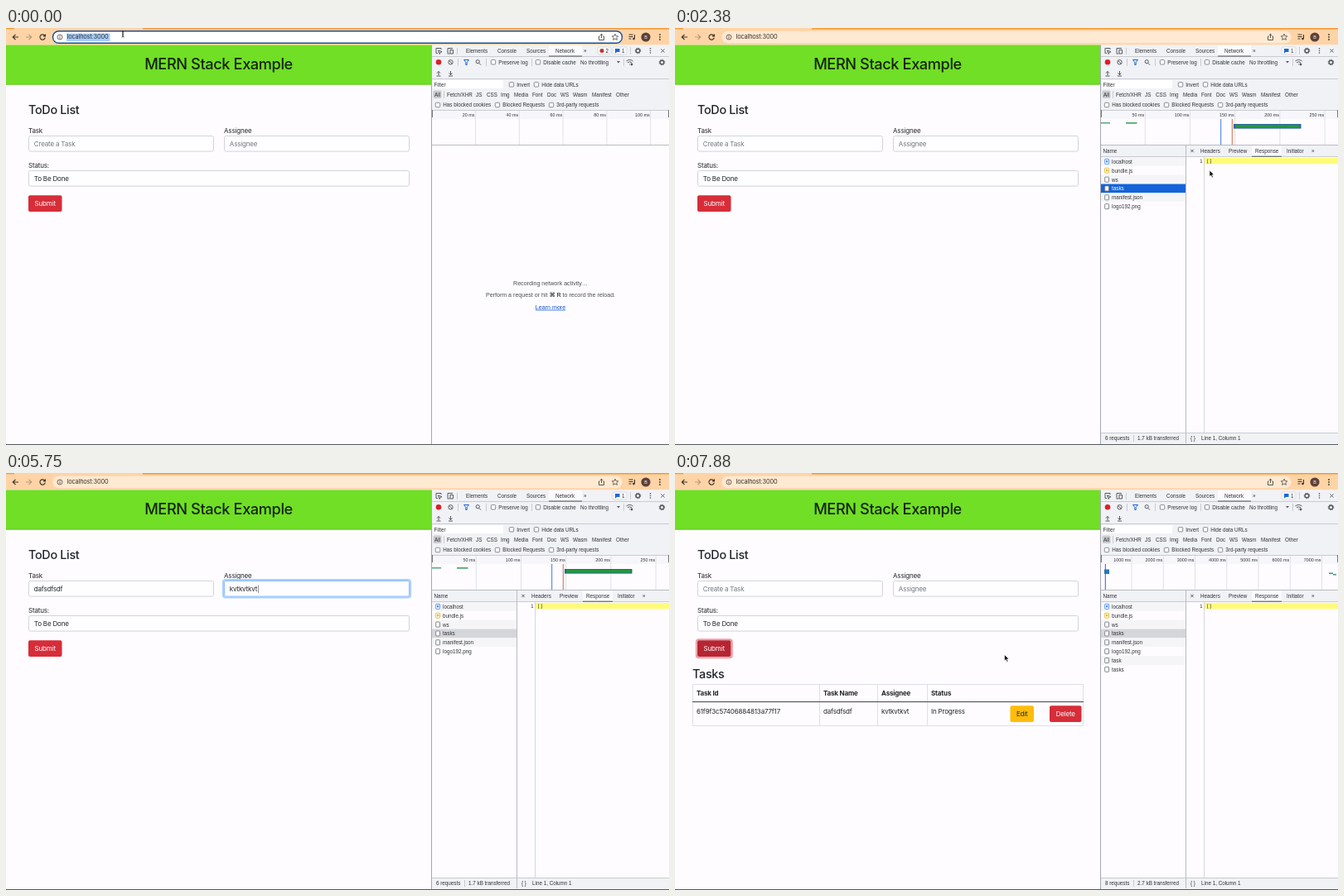
These frames come from a looping animation (800 by 504 pixels, 8000 ms). An HTML page:

```html
<!DOCTYPE html>
<html lang="en">
<head>
<meta charset="utf-8">
<title>MERN Stack Example</title>
<style>
html, body { margin: 0; width: 100%; height: 100%; overflow: hidden; background: #fefcff; }
svg { display: block; position: absolute; left: 0; top: 0; width: 800px; height: 504px; }
text { font: 6.3px "Liberation Sans", Arial, sans-serif; fill: #303236; }
.page { font: 8px Inter, sans-serif; letter-spacing: -.022em; fill: #212529; }
.hint { fill: #73787e; }
.bold { font-weight: 700; }
.light { fill: #fff; }
.h1 { font-size: 18.2px; font-weight: 500; fill: #14230a; }
.h2 { font-size: 14.4px; font-weight: 500; }
.url { font-size: 7.4px; fill: #3a3028; }
.small { font-size: 5.4px; }
.info { font-size: 7.1px; fill: #4b4e53; }
.link { fill: #1155cc; text-decoration: underline; }
.under { text-decoration: underline; }
.mono { font: 6px "DejaVu Sans Mono", monospace; }
.blue { fill: #1a5fd0; }
</style>
</head>
<body>
<svg viewBox="0 0 800 504"><g id="base"></g><g id="live"></g><g id="pointer"></g></svg>
<script>
const LOOP = 8000, STEP = 125;
const INK = '#55585d', LINE = '#c9cbd1', BAR = '#f1f2f6', PAPER = '#fefcff';

const rect = (x, y, w, h, fill, extra = '') =>
  `<rect x="${x}" y="${y}" width="${w}" height="${h}" fill="${fill}" ${extra}/>`;
const text = (x, y, s, cls = '', anchor = 'start') =>
  `<text x="${x}" y="${y}" class="${cls}" text-anchor="${anchor}">${s}</text>`;
const path = (d, stroke = INK, width = 1, fill = 'none') =>
  `<path d="${d}" stroke="${stroke}" stroke-width="${width}" fill="${fill}"/>`;
const disc = (x, y, r, fill, stroke = 'none', width = 1) =>
  `<circle cx="${x}" cy="${y}" r="${r}" fill="${fill}" stroke="${stroke}" stroke-width="${width}"/>`;
const hline = (x1, x2, y, color = LINE) => path(`M${x1} ${y}H${x2}`, color);
const vline = (x, y1, y2, color = LINE) => path(`M${x} ${y1}V${y2}`, color);
const check = (x, y, label) =>
  rect(x - 2.7, y - 2.7, 5.4, 5.4, '#fff', 'rx="1" stroke="#6d7075" stroke-width=".8"') + text(x + 6.3, y + 2.2, label);
const dots = (x, y) => [-2.6, 0, 2.6].map(d => disc(x, y + d, .8, INK)).join('');
const gear = (x, y) => disc(x, y, 2.3, 'none', INK, 1.4) +
  `<circle cx="${x}" cy="${y}" r="3.3" fill="none" stroke="${INK}" stroke-dasharray="1.3 1.29"/>`;
const cross = (x, y, r = 2) => path(`M${x - r} ${y - r}l${2 * r} ${2 * r}m0 ${-2 * r}l${-2 * r} ${2 * r}`);

function browserBar() {
  const dark = '#40362d';
  return rect(0, 0, 800, 20.5, '#fed4a6') + rect(165, 0, 635, 1.6, '#f79b3c') + rect(0, 0, 10, 1.4, '#f79b3c') +
    path('M15 11H8.5m3-3.2l-3.2 3.2 3.2 3.2', dark, 1.2) +
    path('M24 11h6.5m-3-3.2l3.2 3.2-3.2 3.2', '#b89a7b', 1.2) +
    path('M46.8 9.2a3.2 3.2 0 1 0 .5 2.5M47.4 7.4v2.4h-2.5', dark, 1.2) +
    path('M755 8h-3.5m0 0h5M751.500 10.500h5M751.500 13h3M758.500 8v5', dark, 1.1) + disc(757.4, 13.1, 1.3, dark) +
    disc(772, 11, 5.6, '#5d4138') + text(772, 13, 'B', 'small light', 'middle') +
    [8, 11, 14].map(y => disc(789, y, .9, dark)).join('');
}

function page() {
  return rect(0, 20.5, 513, 48, '#70df26') + hline(0, 513, 68, '#66c72a') +
    text(256.5, 50, 'MERN Stack Example', 'page h1', 'middle') +
    text(27, 104, 'ToDo List', 'page h2') +
    text(27, 127, 'Task', 'page') + text(263, 127, 'Assignee', 'page') + text(27, 169, 'Status:', 'page');
}

function devtools() {
  const tabs = [[555, 'Elements'], [593, 'Console'], [628, 'Sources'], [663, 'Network'], [697, '»']];
  const types = [[517, 'All'], [532, 'Fetch/XHR'], [567, 'JS'], [580, 'CSS'], [597, 'Img'], [613, 'Media'],
    [635, 'Font'], [653, 'Doc'], [669, 'WS'], [684, 'Wasm'], [707, 'Manifest'], [736, 'Other']];
  const put = y => ([x, s]) => text(x, y, s);
  return rect(514, 20.5, 286, 79, BAR) +
    rect(655, 21, 40, 13, '#fbfbfe') + [34.5, 61.5, 99.5].map(y => hline(514, 800, y)).join('') +
    hline(655, 695, 34, '#4c5055') + tabs.map(put(29.7)).join('') +
    path('M525 26v-1.500h-6v6h2M521.500 27l4.500 1.700-2 .8-.8 2z') +
    path('M533 30.500v-6h6M536 26.500h3.500v4.500h-3.500zM532.500 31h3') +
    vline(544.5, 24, 32) + gear(762.5, 27.5) + dots(777.5, 27.5) + cross(792.5, 27.5) +
    disc(522, 41.3, 3.3, '#dc2027') + disc(536.5, 41.3, 2.7, 'none', INK) + path('M534.700 39.500l3.600 3.600') +
    vline(545.5, 37, 46) + path('M552.500 38.500h6l-2.300 3v3h-1.400v-3z', '#1a67d8', 1) +
    disc(569.2, 40.7, 2.1, 'none', INK) + path('M570.700 42.300l2.300 2.400') + vline(579.5, 37, 46) +
    check(588, 41.3, 'Preserve log') + vline(634.5, 37, 46) + check(642, 41.3, 'Disable cache') +
    text(693, 43.5, 'No throttling') + path('M737 40h4l-2 2.600z', 'none', 0, INK) + vline(745.5, 37, 46) +
    path('M748.500 40q4-3.200 8 0M750 41.800q2.500-2 5 0M752.500 43.500v.8') + disc(755, 44, 1.4, INK) + gear(791.5, 41.5) +
    path('M522 57v-4.500m-2 2l2-2 2 2M519.500 58h5') + path('M536.500 52v4.500m-2-2l2 2 2-2M534 58h5') +
    rect(515, 63, 85, 10, '#fff') + text(516.5, 70.6, 'Filter') +
    check(610, 68.3, 'Invert') + check(640, 68.3, 'Hide data URLs') +
    rect(515.5, 75.5, 10, 9.5, '#c9cbd0', 'rx="1.5"') + vline(528.5, 76, 85) + types.map(put(82.5)).join('') +
    check(521, 93, 'Has blocked cookies') + check(593, 93, 'Blocked Requests') + check(658, 93, '3rd-party requests');
}

function addressBar(s) {
  const style = s.loaded ? '' : 'stroke="#1c4f94" stroke-width="1.4"';
  return rect(56.5, 3.7, 687, 14.6, s.loaded ? '#fee9d2' : '#fff', `rx="7.3" ${style}`) +
    (s.loaded ? '' : rect(73, 6.5, 52.5, 9.5, '#a5cdfd')) +
    disc(65, 11, 3, 'none', '#50473f', .8) + path('M65 10.300v2.500M65 8.800v.9', '#50473f', .9) +
    text(73.5, 13.4, 'localhost:3000', 'page url') +
    path('M716.500 10h-1v4.500h6V10h-1M718.500 12V7.300m-1.600 1.500l1.600-1.500 1.600 1.500', '#50473f', .9) +
    path('M735 7.200l1.100 2.500 2.700.2-2 1.800.6 2.700-2.400-1.400-2.400 1.400.6-2.700-2-1.800 2.700-.2z', '#50473f', .8);
}

function field(x, y, w, value, hint, focus, caret) {
  const ring = focus ? rect(x - 1, y - 1, w + 2, 21.5, 'none', 'rx="3" stroke="#a9d0fb" stroke-width="2.2"') : '';
  const caretMark = focus && caret ? '<tspan dx=".2" font-weight="300">|</tspan>' : '';
  return ring + rect(x + .5, y + .5, w - 1, 18.6, '#fefdff', `rx="2" stroke="${focus ? '#80b7fb' : '#cdd1d7'}" stroke-width=".9"`) +
    text(x + 6.8, y + 12.8, (value || (caretMark ? '' : hint)) + caretMark, value ? 'page' : 'page hint');
}

function button(x, y, w, label, fill, cls = 'light') {
  return rect(x, y, w, 19.8, fill, 'rx="2"') + text(x + w / 2, y + 12.9, label, 'page ' + cls, 'middle');
}

function form(s) {
  return field(27, 130, 224, s.task, 'Create a Task', s.focus === 'task', true) +
    field(263, 130, 224, s.assignee, 'Assignee', s.focus === 'assignee', true) +
    field(27, 172, 460, 'To Be Done', '', s.focus === 'status', false) +
    (s.focus === 'submit' ? rect(25.8, 201.2, 43, 22, 'none', 'rx="3" stroke="#ee9ca4" stroke-width="2"') : '') +
    button(27, 202.3, 40.5, 'Submit', s.focus === 'submit' ? '#b62632' : '#d62d39');
}

function taskTable() {
  const cols = [[26, 'Task Id', '61f9f3c57406884813a77f17'], [179, 'Task Name', TASK],
    [249, 'Assignee', PERSON], [309, 'Status', 'In Progress']];
  return text(21, 247.5, 'Tasks', 'page h2') +
    rect(21.5, 255.5, 471, 50, 'none', 'stroke="#dde0e5"') +
    [174.5, 244.5, 304.5].map(x => vline(x, 255, 305, '#dde0e5')).join('') +
    hline(21, 493, 276.6, '#3b3f44') +
    cols.map(([x, head, cell]) => text(x, 269, head, 'page bold') + text(x, 290.8, cell, 'page')).join('') +
    button(404.5, 281.3, 28.5, 'Edit', '#ffbc0b', '') + button(452, 281.3, 38.5, 'Delete', '#d62d39');
}

function overview(s) {
  const [first, gap, unit, count] = !s.loaded ? [566.5, 52.8, 20, 5] : s.saved ? [551, 38.25, 1000, 7] : [567.3, 54.2, 50, 5];
  let out = rect(514, 100, 286, 41.5, PAPER) + rect(514, 100, 286, 10, '#f7f7fb');
  for (let i = 0; i < count; i++) {
    const x = first + i * gap;
    out += vline(x, 100, 141, '#e0e1e6') + text(x - 1, 106.6, `${(i + 1) * unit} ms`, 'small', 'end');
  }
  if (s.saved) {
    out += rect(518, 116.500, 6, 5.5, '#2e78b7') + vline(519.3, 110, 141, '#2866c8') +
      rect(789, 120.500, 5, 1.5, '#3f9c79') + rect(794, 122, 4, 1.5, '#3f9c79');
  } else if (s.loaded) {
    out += rect(514, 114, 11, 1.5, '#55a77d') + rect(544, 114, 13.500, 1.7, '#4ca665') +
      vline(658.7, 110, 141, '#3a7be0') + vline(672.3, 110, 141, '#cd6a48') +
      rect(674, 116, 81.5, 5.6, '#2763a5') + rect(676, 117, 78, 3.6, '#24983b');
  }
  return out + vline(514.5, 99, 108, '#777') + vline(799.5, 99, 108, '#777') + hline(514, 800, 141.5, '#b9bbc1');
}

const ROWS = [
  ['localhost', '304', 'do…', 'Other', '29…', '7 ms'],
  ['bundle.js', '304', 'script', '(index)', '30…', '12 …'],
  ['ws', '101', 'we…', 'WebSo…', '0 B', 'Pe…'],
  ['tasks', '200', 'fetch', 'TaskSer…', '32…', '72 …'],
  ['manifest.json', '304', 'ma…', 'Other', '36…', '2 ms'],
  ['logo192.png', '304', 'png', 'Other', '36…', '2 ms'],
  ['task'], ['tasks']
];
const rowTop = i => 156 + i * 10.85;

function requestRow(row, i, s) {
  const top = rowTop(i), y = top + 7.8, picked = i === 3 && s.picked;
  const width = s.panel ? 102.5 : 286;
  const fill = picked ? (s.focus ? '#d5d6da' : '#1463d9') : i % 2 ? PAPER : '#f5f5f8';
  const tone = picked && !s.focus ? 'light' : '';
  const icon = ['#4c8ff0', '#e3b627'][i] || '#777b82';
  let out = rect(514, top, width, 10.85, fill) +
    rect(518.7, top + 2.4, 4.8, 6, '#fff', `rx=".6" stroke="${icon}" stroke-width=".9"`) +
    (i < 2 ? rect(520, top + 4, 2.2, 2.5, icon) : '') + text(527, y, row[0], tone);
  if (!s.panel) {
    const linked = i > 0 && i < 4 ? 'under ' : '';
    out += text(584, y, row[1], tone) + text(604, y, row[2], tone) + text(624.500, y, row[3], linked + tone) +
      text(673.5, y, row[4], tone, 'end') + text(694.5, y, row[5], tone, 'end');
  }
  return out;
}

function waterfall(count) {
  const bars = [[0, 700, 6, '#25a04b'], [1, 712, 7, '#25a04b'], [2, 764.5, 3, '#8b6a50'],
    [3, 767.5, 33, '#18a135'], [4, 769, 2, '#3f90e9'], [5, 770, 2.2, '#3f90e9']];
  return bars.filter(b => b[0] < count).map(([i, x, w, fill]) => rect(x, rowTop(i) + 2.6, w, 5.8, fill) +
      (i < 2 ? rect(x + w - 1.5, rowTop(i) + 2.6, 1.5, 5.8, '#3179ce') + rect(x - 1.5, rowTop(i) + 4.500, 1.5, 2, '#b8bbc2') : '') +
      (i === 3 ? rect(765.500, rowTop(3) + 3.5, 2, 4, '#f2a23a') : '')).join('') +
    vline(759, 156, 489, '#5f93dc') + vline(765, 156, 489, '#b07a5d');
}

function responsePanel() {
  const tabs = [[634, 'Headers'], [668, 'Preview'], [700, 'Response'], [738, 'Initiator'], [768, '»']];
  return rect(617, 142, 183, 347, PAPER) + rect(617, 142, 183, 13.5, BAR) + rect(696, 142, 36, 13.5, '#fafafd') +
    hline(617, 800, 155.5) + hline(696, 732, 155.2, '#4c5055') + cross(624, 148.5, 1.7) +
    tabs.map(([x, s]) => text(x, 150.6, s)).join('') +
    rect(639, 157, 161, 7.3, '#fffb78') + vline(638.5, 156, 489, '#d5d6db') +
    text(636.500, 163, '1', 'mono', 'end') + text(641, 162.8, '[]', 'mono') + vline(616.5, 142, 502, '#b9bbc1');
}

function network(s) {
  if (!s.loaded) return rect(514, 142, 286, 361, PAPER) +
    text(657, 311, 'Recording network activity…', 'info', 'middle') +
    text(657, 325.3, 'Perform a request or hit <tspan font-weight="700">⌘ R</tspan> to record the reload.', 'info', 'middle') +
    text(657, 339.700, 'Learn more', 'info link', 'middle');

  const count = s.saved ? 8 : s.rows;
  let out = rect(514, 142, 286, 361, PAPER) + rect(514, 142, 286, 13.5, BAR) + hline(514, 800, 155.5) +
    ROWS.slice(0, count).map((row, i) => requestRow(row, i, s)).join('') +
    rect(514, 489, 286, 14, BAR) + hline(514, 800, 489.5) + text(516.5, 150.6, 'Name') +
    text(519, 498.4, s.saved ? '8 requests' : `${count} requests`) + vline(553.5, 492, 500) +
    text(558, 498.4, s.saved ? '2.7 kB transferred' : '1.7 kB transferred');
  if (s.panel) return out + responsePanel() + text(622, 498.4, '{ }') + text(635, 498.4, 'Line 1, Column 1');

  const heads = [[584, 'St…'], [604, 'Type'], [624.5, 'Initiator'], [658, 'Size'], [678.5, 'Time'], [698.5, 'Waterfall']];
  return out + [581.5, 601.5, 622.5, 655.5, 676.5, 696.5].map(x => vline(x, 142, 489, '#d6d7dc')).join('') +
    heads.map(([x, h]) => text(x, 150.6, h)).join('') + path('M790 150.500h5l-2.500-4z', 'none', 0, INK) +
    waterfall(count) + vline(612.5, 492, 500) + text(617, 498.4, '2.8 MB resources') +
    vline(671.5, 492, 500) + text(676, 498.4, 'Finish: 219 ms') + vline(721.5, 492, 500) +
    text(726, 498.4, 'DOMContentLoaded: 131', 'blue');
}

function badges(s) {
  const chip = (x, w) => rect(x, 23, w, 9, '#f8f8fb', 'rx="1.5" stroke="#d0d2d8" stroke-width=".7"');
  const errors = s.loaded ? '' : chip(714, 16) + disc(719, 27.5, 2.5, '#d93025') + cross(719, 27.5, .9) + text(723.5, 29.7, '2');
  return errors + chip(732, 17) + path('M735 25h5.500v4h-3.500l-2 1.800z', 'none', 0, '#1a67d8') + text(743, 29.7, '1') + vline(753.5, 23, 32);
}

// step, x, y, shape
const MOVES = [
  [0, 141, 7, 'beam'], [5, 141, 8, 'arrow'], [13, 537, 192, 'hand'], [16, 539, 194, 'arrow'],
  [19, 645, 172, 'arrow'], [22, 640, 168, 'arrow'], [26, 38, 152, 'arrow'], [28, 115, 143, 'beam'],
  [38, 115, 143, 'beam'], [40, 300, 141, 'beam'], [41, 300, 141, 'none'], [47, 300, 141, 'beam'],
  [50, 150, 183, 'arrow'], [52, 150, 183, 'arrow'], [55, 62, 208, 'arrow'], [58, 62, 208, 'arrow'], [63, 397.5, 219.5, 'arrow']
];
const SHAPES = {
  arrow: path('M0 0v7.600l1.800-1.600 1.300 2.900 1.300-.6-1.300-2.800h2.400z', '#fff', .6, '#111'),
  hand: path('M.3 1.200q0-1 .9-1t.9 1v2.800l3 .7q1 .3.8 1.500l-.6 3H1.800L-.6 6q0-1 .9-.8z', '#fff', .7, '#111'),
  beam: path('M-1.500-3.500q1.500 0 1.500 1v5.500q0 1-1.500 1M1.500-3.500q-1.500 0-1.500 1v5.500q0 1 1.500 1', '#222', .8),
  none: ''
};

function pointer(step) {
  const i = MOVES.findLastIndex(m => m[0] <= step);
  const a = MOVES[i], b = MOVES[i + 1] || a;
  const p = b === a ? 0 : (step - a[0]) / (b[0] - a[0]);
  const e = p * p * (3 - 2 * p);
  return `<g transform="translate(${a[1] + (b[1] - a[1]) * e} ${a[2] + (b[2] - a[2]) * e})">${SHAPES[a[3]]}</g>`;
}

const TASK = 'dafsdfsdf', PERSON = 'kvtkvtkvt';
const typed = (word, step, start, rate) => word.slice(0, Math.max(0, Math.floor((step - start) * rate)));
const FOCUS = [[0, ''], [28, 'task'], [40, 'assignee'], [50, 'status'], [56, 'submit']];

function stateAt(step) {
  const saved = step >= 58;
  return {
    saved, loaded: step >= 2, rows: step < 3 ? 3 : 6, picked: step >= 15, panel: step >= 16,
    focus: FOCUS.findLast(f => f[0] <= step)[1],
    task: saved ? '' : typed(TASK, step, 29, 1),
    assignee: saved ? '' : typed(PERSON, step, 40, 1.6)
  };
}

const layer = id => document.getElementById(id);
layer('base').innerHTML = rect(0, 0, 800, 504, PAPER) + browserBar() + page() + devtools();
let shown = -1;

function frame(now) {
  const step = Math.floor((now % LOOP) / STEP);
  if (step !== shown) {
    const s = stateAt(step);
    layer('live').innerHTML = addressBar(s) + form(s) + (s.saved ? taskTable() : '') + badges(s) + overview(s) + network(s) +
      vline(513.5, 20.5, 503, '#a5a8ae') + hline(0, 800, 503.5, '#55585c');
    layer('pointer').innerHTML = pointer(step);
    shown = step;
  }
  requestAnimationFrame(frame);
}
frame(0);
</script>
</body>
</html>
```
